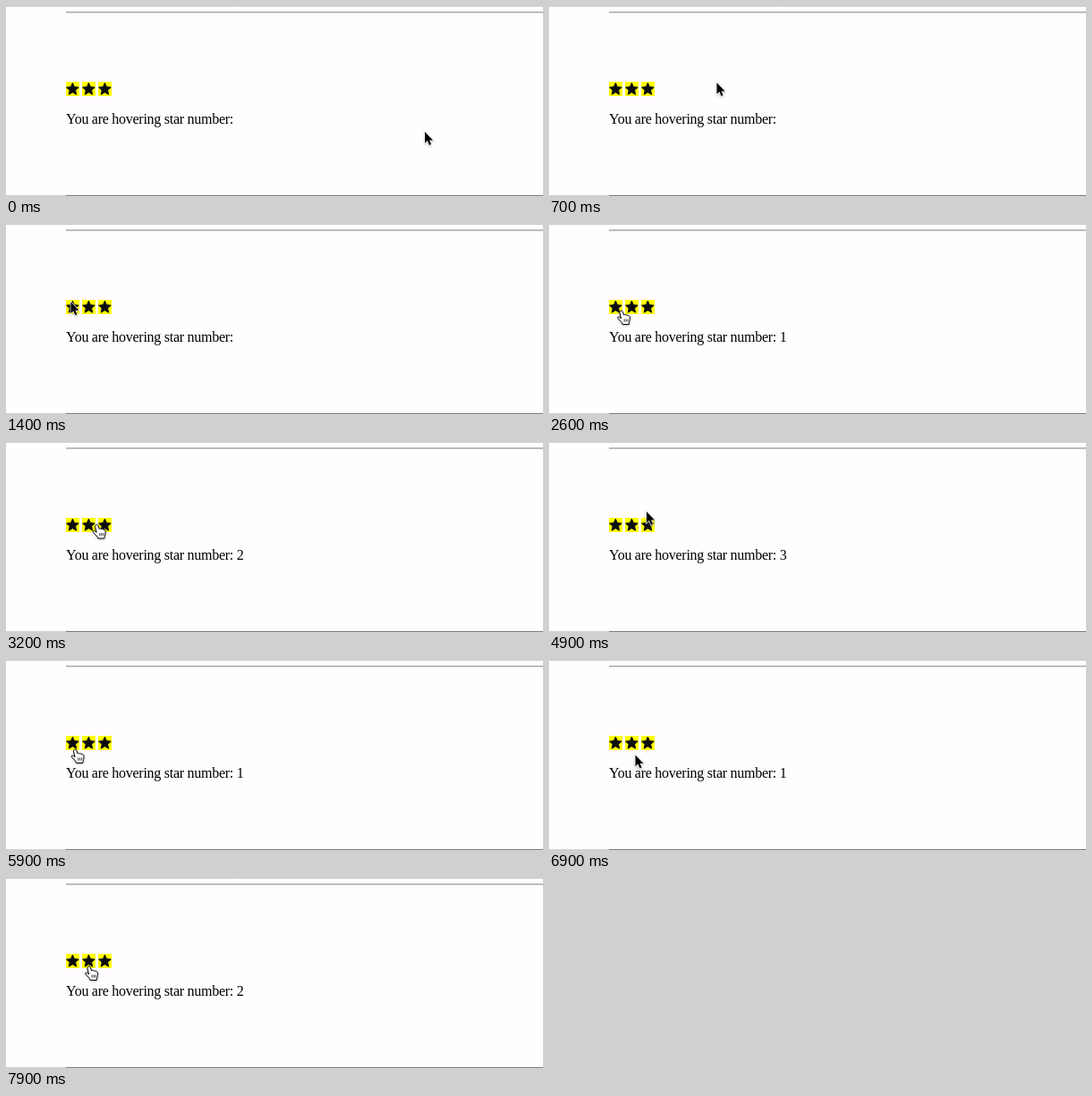
An HTML page for the animation above (8000 ms loop, 600 by 213 pixels).

```html
<!DOCTYPE html>
<html lang="en">
<head>
<meta charset="utf-8">
<title>Star hover</title>
<style>
html, body { margin: 0; width: 100%; height: 100%; overflow: hidden; background: #fffdff; }
svg { display: block; }
text { font: 16px "Liberation Serif", "Times New Roman", Times, serif; letter-spacing: -.27px; white-space: pre; }
#cursor { filter: drop-shadow(0 1px 1px #0004); }
</style>
</head>
<body>
<svg width="600" height="213" viewBox="0 0 600 213">
  <path d="M0 .5H600M0 212.5H67" stroke="#d2d1d2"/>
  <path d="M67 7H600M67 212.5H600" stroke="#7d7c7d"/>
  <g id="stars"></g>
  <text x="67" y="131.5">You are hovering star number: <tspan id="count"></tspan></text>
  <g id="cursor">
    <path id="arrow" d="M0 0V12.8L2.9 10.1 5 15 7.1 14.1 5.1 9.4H9.1Z" stroke="#fff" stroke-width="1.4" paint-order="stroke"/>
    <g id="hand" stroke="#000" stroke-linejoin="round">
      <path fill="#fff" d="M0 .5C1-.2 2 .2 2.4 1.4L3.6 5C4.4 4.2 5.8 4.4 6.1 5.3 7 4.6 8.2 5 8.5 6 9.6 5.6 10.4 6.2 10.5 7.5L10.4 10.5C10.3 12 9.4 13 9.3 15.5H2.2C1.8 13.5-.5 11.5-2.8 9-4.2 7.3-2.4 6.6-1 7.6L.6 8.8-.9 3C-1.2 1.8-1 .9 0 .5Z"/>
      <path stroke-width=".8" d="M4.2 9.5V12.6M6.2 9.5V12.6M8.2 9.5V12.6"/>
    </g>
  </g>
</svg>
<script>
const $ = id => document.getElementById(id);
const LOOP = 8000, STEP = 100, MAX_MOVE = 500, LIVE_FROM = 1700;
const LEFT = 67, PITCH = 18;

// Places the pointer visits: arrival time, x, y of its tip
const stops = [
  [0, 468, 141], [100, 300, 153], [200, 71, 86], [800, 201, 86],
  [1300, 69, 92], [1600, 82, 74], [2200, 72, 92], [2600, 80, 97],
  [3300, 103, 92], [4000, 202.5, 36.5], [4600, 106, 93], [4900, 109, 78],
  [5500, 90, 92], [5900, 76.5, 100], [6500, 53, 105], [6900, 96.5, 106.5],
  [7100, 109, 104], [7900, 92, 99]
];

function starPath(cx, cy, r) {
  const points = Array.from({ length: 10 }, (_, i) => {
    const a = i * Math.PI / 5, d = i % 2 ? r * 0.47 : r;
    return [cx + d * Math.sin(a), cy - d * Math.cos(a)].map(v => v.toFixed(2));
  });
  return "M" + points.join("L") + "Z";
}

$("stars").innerHTML = [0, 1, 2].map(i => LEFT + i * PITCH).map(x =>
  `<rect x="${x}" y="85" width="15" height="16" fill="#ff0"/>
   <path d="${starPath(x + 7.4, 93.4, 7.2)}" fill="#0c0c0c" stroke="#0c0c0c" stroke-linejoin="round"/>`
).join("");

// The pointer rests at a stop, then eases to the next one
function pointerAt(t) {
  const i = stops.findIndex(s => s[0] > t);
  if (i < 0) return stops.at(-1).slice(1);
  const [t0, x0, y0] = stops[i - 1], [t1, x1, y1] = stops[i];
  const from = Math.max(t0, t1 - MAX_MOVE);
  const k = Math.max(0, (t - from) / (t1 - from));
  const ease = k * k * (3 - 2 * k);
  return [x0 + (x1 - x0) * ease, y0 + (y1 - y0) * ease];
}

// Number of the star under the pointer, or 0
function hoveredAt(t) {
  const [x, y] = pointerAt(t);
  const n = Math.floor((x - LEFT + 1) / PITCH) + 1;
  return t >= LIVE_FROM && y > 86 && y < 101 && n >= 1 && n <= 3 ? n : 0;
}

function draw(now) {
  const t = Math.floor(now % LOOP / STEP) * STEP;
  let last = "";
  for (let s = 0; s <= t; s += STEP) last = hoveredAt(s) || last;
  const isHand = hoveredAt(t) > 0;
  $("cursor").setAttribute("transform", `translate(${pointerAt(t)})`);
  $("hand").style.display = isHand ? "" : "none";
  $("arrow").style.display = isHand ? "none" : "";
  $("count").textContent = last;
}

const start = performance.now();
function tick() {
  draw(performance.now() - start);
  requestAnimationFrame(tick);
}
tick();
</script>
</body>
</html>
```
